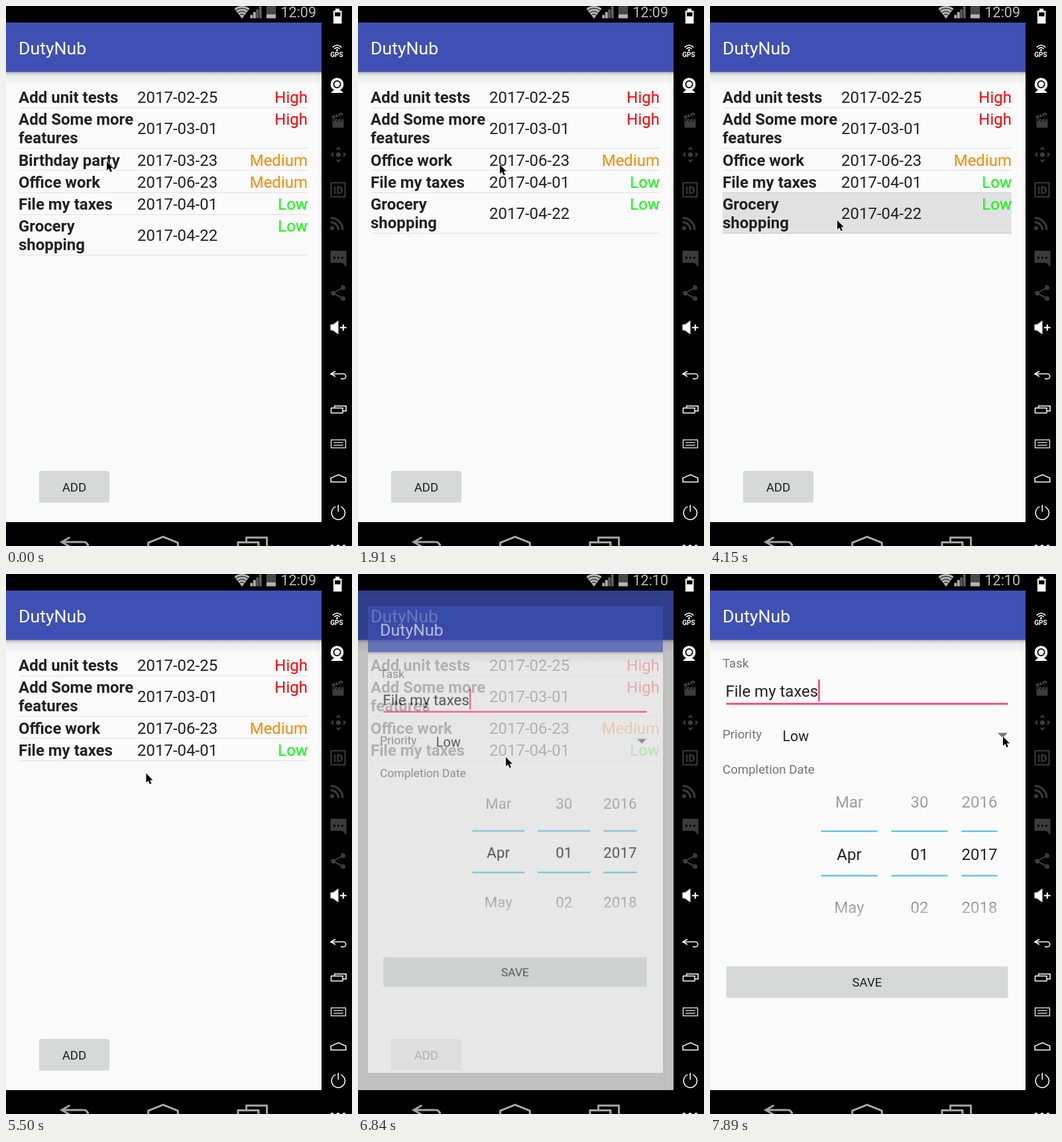
Write an HTML page with a canvas that moves like this. It is 522 by 814 pixels and loops after 8 s.

```html
<!DOCTYPE html>
<html lang="en">
<head>
<meta charset="utf-8">
<title>Task list</title>
<style>
html, body { margin: 0; width: 100%; height: 100%; overflow: hidden; background: #000; }
canvas { display: block; width: 522px; height: 814px; }
</style>
</head>
<body>
<canvas id="stage" width="522" height="814"></canvas>
<script>
const W = 522, H = 814, SCREEN = 476, LOOP = 8000, STEP = 150;
const TOP = 25, BOTTOM = 778, BODY = BOTTOM - TOP;
const OPEN = 6840, OPENED = OPEN + STEP;
const APP = 'DutyNub';
const INK = '#212121', MUTED = '#757575', PINK = '#ff4081';
const WHITE = '#fff', BLACK = '#000', DIM = '#3c3c3c', SOFT = '#b4b4b4';
const view = document.getElementById('stage').getContext('2d');
const layer = document.createElement('canvas');
layer.width = W;
layer.height = H;
const form = layer.getContext('2d');

const tasks = [
  { name: ['Add unit tests'], date: '2017-02-25', level: 'High' },
  { name: ['Add Some more', 'features'], date: '2017-03-01', level: 'High' },
  { name: ['Birthday party'], date: '2017-03-23', level: 'Medium', press: 450, gone: 1020 },
  { name: ['Office work'], date: '2017-06-23', level: 'Medium' },
  { name: ['File my taxes'], date: '2017-04-01', level: 'Low' },
  { name: ['Grocery', 'shopping'], date: '2017-04-22', level: 'Low', press: 4150, gone: 4750 }
];
const levelColor = { High: '#ff0000', Medium: '#ff8800', Low: '#00ff00' };

// Each pointer move runs in sampled steps from the previous resting place.
const home = { x: 151, y: 233 };
const moves = [
  { at: 1760, steps: 2, x: 213, y: 238 },
  { at: 2950, steps: 3, x: 191, y: 322 },
  { at: 5500, steps: 2, x: 220, y: 277 },
  { at: 5950, steps: 1, x: 222, y: 275 },
  { at: 7140, steps: 6, x: 441, y: 244 }
];

const lerp = (a, b, u) => a + (b - a) * u;
const easeOut = u => 1 - (1 - u) ** 1.6;

function text(c, str, x, y, size, color, align = 'left', weight = 400) {
  c.font = `${weight} ${size}px Roboto, "Noto Sans", sans-serif`;
  c.textAlign = align;
  c.fillStyle = color;
  c.fillText(str, x, y);
}

function box(c, x, y, w, h, color) {
  c.fillStyle = color;
  c.fillRect(x, y, w, h);
}

function frame(c, x, y, w, h, color, width) {
  c.strokeStyle = color;
  c.lineWidth = width;
  c.strokeRect(x, y, w, h);
}

function poly(c, points, color) {
  c.beginPath();
  points.forEach(p => c.lineTo(...p));
  c.fillStyle = color;
  c.fill();
}

function line(c, points, color, width) {
  c.beginPath();
  points.forEach(p => c.lineTo(...p));
  c.strokeStyle = color;
  c.lineWidth = width;
  c.stroke();
}

function disc(c, x, y, r, color) {
  c.beginPath();
  c.arc(x, y, r, 0, Math.PI * 2);
  c.fillStyle = color;
  c.fill();
}

function arc(c, x, y, r, from, to, color, width) {
  c.beginPath();
  c.arc(x, y, r, from * Math.PI, to * Math.PI);
  c.strokeStyle = color;
  c.lineWidth = width;
  c.stroke();
}

function fade(c, y, h, from, to) {
  const g = c.createLinearGradient(0, y, 0, y + h);
  g.addColorStop(0, from);
  g.addColorStop(1, to);
  return g;
}

function button(c, x, y, w, h, label) {
  c.beginPath();
  c.roundRect(x, y, w, h, 2.5);
  c.fillStyle = '#d6d7d7';
  c.fill();
  text(c, label, x + w / 2, y + h / 2 + 7, 18.67, INK, 'center');
}

function page(c) {
  box(c, 0, TOP, SCREEN, BODY, '#fafafa');
  box(c, 0, 99, SCREEN, 17, fade(c, 99, 17, '#e2e2e2', '#f5f5f5'));
  box(c, 0, 99, SCREEN, 5, fade(c, 99, 5, '#b4b4b4', '#e4e4e4'));
  box(c, 0, TOP, SCREEN, 74.5, '#3f51b5');
  text(c, APP, 19, 73, 26.67, WHITE);
}

function drawList(c, t) {
  page(c);
  let top = 120;
  for (const task of tasks) {
    if (t >= task.gone) continue;
    const extra = task.name.length - 1;
    const base = Math.floor(top + 26.5);
    const bottom = top + 33.25 + extra * 28.05;
    const y = Math.floor(top), end = Math.floor(bottom);
    box(c, 19, end, 436, 1, '#e0e0e0');
    if (t >= task.press) {
      const shade = 0.1 + 0.007 * Math.floor((t - task.press) / STEP);
      box(c, 19, y, 436, end - y + 1, `rgba(0,0,0,${shade})`);
    }
    task.name.forEach((s, i) => text(c, s, 19, base + i * 28, 24, INK, 'left', 700));
    text(c, task.date, 198, base + extra * 14, 24, INK);
    text(c, task.level, 455, base, 24, levelColor[task.level], 'right');
    top = bottom;
  }
  button(c, 50, 701, 106, 47.5, 'ADD');
}

function drawPicker(c, x, w, values) {
  values.forEach((value, i) => {
    const y = 351.5 + i * 79.5;
    const color = i === 1 ? INK : fade(c, y - 19, 22, i ? '#8e8e8e' : '#ababab', i ? '#b8b8b8' : '#929292');
    text(c, value, x, y, 24, color, 'center');
  });
  for (const y of [386.5, 453.5]) box(c, x - w / 2, y, w, 2.5, '#66c6ed');
}

function drawForm(c, t) {
  page(c);
  text(c, 'Task', 19, 141, 18.67, MUTED);
  text(c, 'File my taxes', 23.5, 185, 24, INK);
  const caretOn = (t - OPEN + 50) % 1000 < 500;
  if (caretOn) box(c, 163.2, 159, 2.6, 33, PINK);
  box(c, 24.5, 194.3, 425, 2.7, PINK);
  text(c, 'Priority', 19, 248, 18.67, MUTED);
  text(c, 'Low', 109.5, 252, 21.33, INK);
  poly(c, [[434, 239.5], [449, 239.5], [441.5, 247]], MUTED);
  text(c, 'Completion Date', 19, 300.5, 18.67, MUTED);
  drawPicker(c, 210, 85, ['Mar', 'Apr', 'May']);
  drawPicker(c, 316, 85, ['30', '01', '02']);
  drawPicker(c, 406.5, 54, ['2016', '2017', '2018']);
  button(c, 24.5, 591.5, 425, 47.5, 'SAVE');
}

function drawStatus(c, t) {
  box(c, 0, 0, SCREEN, TOP, BLACK);
  // Wireless: a fan cut by dark arcs
  c.beginPath();
  c.moveTo(356, 19);
  c.arc(356, 19, 19, -0.71 * Math.PI, -0.29 * Math.PI);
  c.fillStyle = SOFT;
  c.fill();
  for (let r = 6.5; r < 18; r += 4.5) arc(c, 356, 19, r, -0.75, -0.25, BLACK, 1);
  for (let i = 0; i < 4; i++) {
    const h = 5 + i * 4.3;
    box(c, 368.5 + i * 4.5, 18.5 - h, 3.7, h, i < 2 ? SOFT : '#606060');
  }
  box(c, 393, 0, 14, 12.5, '#484848');
  box(c, 393, 12.5, 14, 6, SOFT);
  text(c, t < 6700 ? '12:09' : '12:10', 414.5, 17, 21.5, '#bdbdbd');
}

// Key shapes are drawn around the current origin.
function backKey(c, s, color, width) {
  line(c, [[7 * s, -4 * s], [0, 0], [7 * s, 4 * s]], color, width);
  line(c, [[0, 0], [19 * s, 0]], color, width);
  arc(c, 19 * s, 3.75 * s, 3.75 * s, -0.5, 0.5, color, width);
  line(c, [[19 * s, 7.5 * s], [15 * s, 7.5 * s]], color, width);
}

function homeKey(c, w, roof, h, color, width) {
  line(c, [[0, h], [-w, h], [-w, roof], [0, 0], [w, roof], [w, h], [0, h]], color, width);
}

function recentKey(c, w, h, gap, color, width) {
  frame(c, 0, 0, w, h, color, width);
  const x = gap * 1.15, y = -gap * 0.65;
  line(c, [[x, 0], [x, y], [x + w, y], [x + w, y + h], [w, y + h]], color, width);
}

function place(c, x, y, paint) {
  c.save();
  c.translate(x, y);
  paint(c);
  c.restore();
}

function drawNav(c) {
  const color = '#a6a6a6';
  box(c, 0, BOTTOM, SCREEN, H - BOTTOM, BLACK);
  place(c, 84, 808, () => backKey(c, 1.75, color, 3));
  place(c, 237, 800, () => homeKey(c, 22.3, 9, 20, color, 3));
  place(c, 350, 808.5, () => recentKey(c, 31, 16, 11, color, 3));
}

// Side tools from top to bottom, each centred on its own origin.
const tools = [
  function battery(c) {
    box(c, -4, -12, 6, 3, WHITE);
    box(c, -7, -9, 12.5, 19.5, WHITE);
    box(c, -5, -6.5, 8.5, 6, BLACK);
  },
  function location(c) {
    disc(c, -1.5, -1.5, 1.6, WHITE);
    for (const r of [4.7, 8.3]) arc(c, -1.5, -0.5, r, -0.8, -0.2, WHITE, 1.6);
    text(c, 'GPS', -2, 8.5, 10, WHITE, 'center', 700);
  },
  function webcam(c) {
    disc(c, -1.5, -2, 9.8, WHITE);
    disc(c, -1.5, -2, 6, BLACK);
    disc(c, -1.5, -2, 4.2, WHITE);
    poly(c, [[-7, 7], [4, 7], [8, 11], [-11, 11]], WHITE);
  },
  function clapper(c) {
    box(c, -8.5, -1.5, 17, 13, DIM);
    line(c, [[-9, -4], [7, -9.5]], DIM, 4.5);
    for (let x = -6; x < 7; x += 5) {
      line(c, [[x, -9], [x + 3, -4]], BLACK, 1.3);
      line(c, [[x + 1, -1.5], [x - 1, 2.5]], BLACK, 1.3);
    }
  },
  function move(c) {
    disc(c, 0.5, 0, 3.6, DIM);
    c.translate(0.5, 0);
    for (let i = 0; i < 4; i++) {
      poly(c, [[0, -12], [4, -7.5], [-4, -7.5]], DIM);
      c.rotate(Math.PI / 2);
    }
  },
  function identity(c) {
    frame(c, -10.5, -10.5, 21, 21, DIM, 2);
    text(c, 'ID', 0, 5.5, 15.5, DIM, 'center', 700);
  },
  function feed(c) {
    disc(c, -9, 6, 2.9, DIM);
    for (const r of [11.5, 18]) arc(c, -11, 8.5, r, -0.5, 0, DIM, 3.2);
  },
  function message(c) {
    box(c, -11.5, -12, 24, 18, DIM);
    poly(c, [[5, 5], [12.5, 5], [12.5, 12]], DIM);
    for (let x = -6; x < 7; x += 6) disc(c, x + 0.5, -1.5, 1.7, BLACK);
  },
  function share(c) {
    const nodes = [[7.5, -8.5], [-7.5, 0], [7.5, 8]];
    line(c, nodes, DIM, 2);
    nodes.forEach(([x, y]) => disc(c, x, y, 3.6, DIM));
  },
  function louder(c) {
    box(c, -11.5, -5, 5, 9, WHITE);
    poly(c, [[-8, -4.5], [0.5, -11], [0.5, 10], [-8, 4]], WHITE);
    line(c, [[3, -0.3], [12.5, -0.3]], WHITE, 2);
    line(c, [[7.8, -5], [7.8, 4.5]], WHITE, 2);
  },
  c => place(c, -11, -1.5, () => backKey(c, 1, WHITE, 1.5)),
  c => place(c, -10.5, -2, () => recentKey(c, 17.5, 7.5, 4.5, WHITE, 1.5)),
  function menu(c) {
    frame(c, -10.5, -6, 22, 12, WHITE, 1.2);
    for (const y of [-2, 2]) line(c, [[-7, y], [7.5, y]], WHITE, 1.2);
  },
  c => place(c, 0.5, -5.5, () => homeKey(c, 11.3, 5, 11, WHITE, 1.5)),
  function power(c) {
    arc(c, 0.3, 0, 10.2, -0.37, 1.37, WHITE, 1.6);
    line(c, [[0.3, -12], [0.3, -1.5]], WHITE, 1.6);
  },
  function more(c) {
    for (let x = -9; x < 10; x += 9) disc(c, x, -2.5, 2.6, WHITE);
  }
];

function drawTools(c) {
  box(c, SCREEN, 0, W - SCREEN, H, BLACK);
  tools.forEach((tool, i) => {
    const gap = i < 10 ? 0 : 18;
    place(c, 501, Math.round(15.5 + 52.2 * i + gap), tool);
  });
}

function pointerAt(t) {
  let { x, y } = home;
  for (const m of moves) {
    if (t < m.at) break;
    const u = Math.min((Math.floor((t - m.at) / STEP) + 1) / m.steps, 1);
    x = lerp(x, m.x, easeOut(u));
    y = lerp(y, m.y, u);
  }
  return [x, y];
}

function drawPointer(c, t) {
  const [x, y] = pointerAt(t);
  const shape = [[0, 0], [0, 14], [3.2, 11], [5.6, 16.3], [8, 15.3], [5.7, 10.2], [10, 10.2], [0, 0]];
  place(c, x + 1, y + 1, () => {
    c.lineJoin = 'round';
    line(c, shape, WHITE, 1.6);
    poly(c, shape, BLACK);
  });
}

function draw(t) {
  if (t < OPENED) drawList(view, t);
  if (t >= OPEN) {
    drawForm(form, t);
    view.save();
    if (t < OPENED) {
      box(view, 0, TOP, SCREEN, BODY, 'rgba(0,0,0,.23)');
      view.globalAlpha = 0.68;
      view.translate(236, 381);
      view.scale(0.935, 0.935);
      view.translate(-236, -381);
    }
    view.drawImage(layer, 0, TOP, SCREEN, BODY, 0, TOP, SCREEN, BODY);
    view.restore();
  }
  drawStatus(view, t);
  drawNav(view);
  drawTools(view);
  drawPointer(view, t);
}

const start = performance.now();
function tick() {
  draw((performance.now() - start) % LOOP);
  requestAnimationFrame(tick);
}
tick();
</script>
</body>
</html>
```
